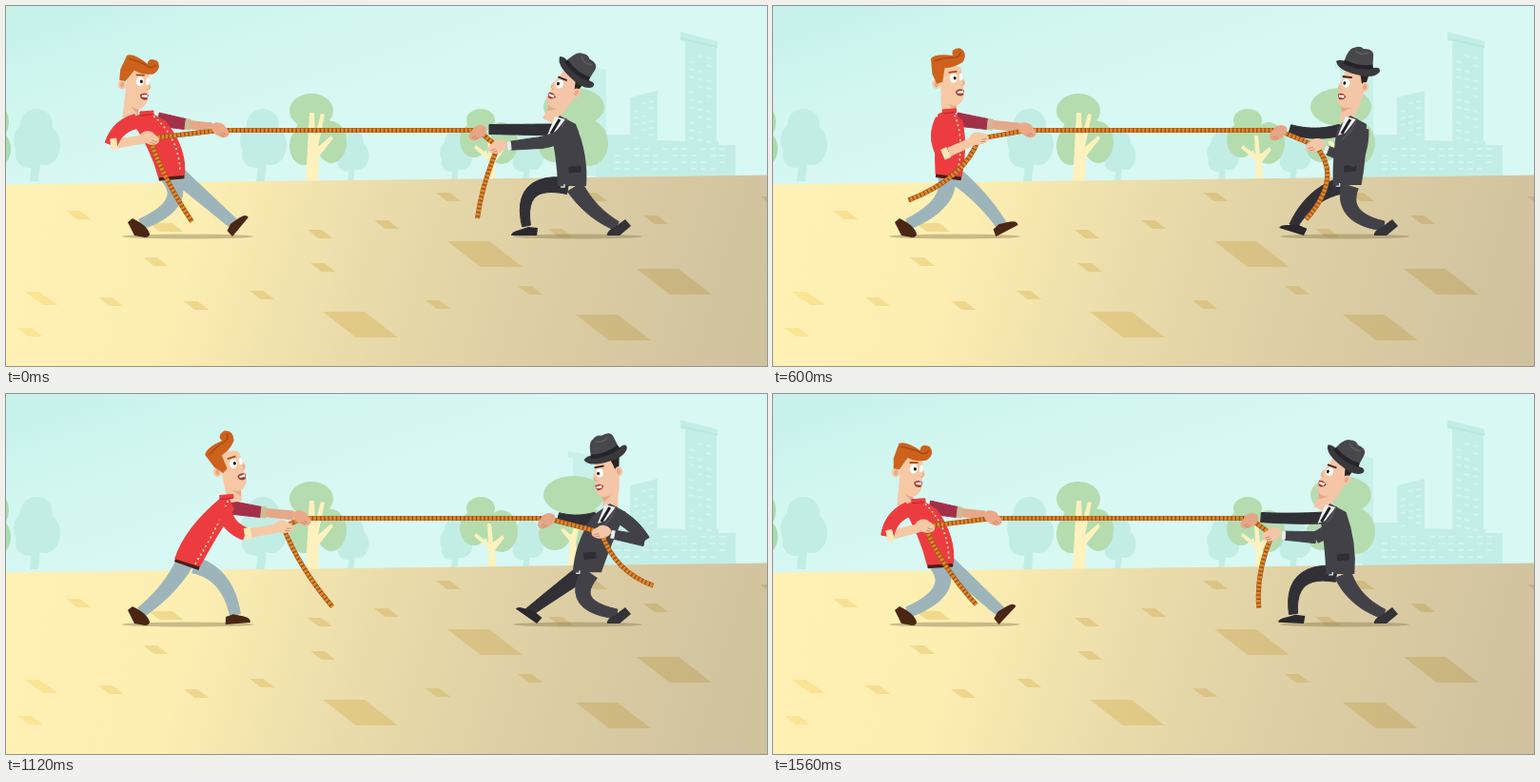
An HTML page that plays this animation: 800x378 px, repeating every 1600 ms.

```html
<!DOCTYPE html>
<html lang="en">
<head>
<meta charset="utf-8">
<title>Tug of war</title>
<style>
html, body { margin: 0; width: 100%; height: 100%; overflow: hidden; background: #d2f6f0; }
svg { display: block; width: 100vw; height: 100vh; }
</style>
</head>
<body>
<svg viewBox="0 0 800 378" preserveAspectRatio="none">
  <defs>
    <linearGradient id="sky" gradientUnits="userSpaceOnUse" x1="60" y1="0" x2="120" y2="180">
      <stop offset="0" stop-color="#c8f1eb"/><stop offset=".45" stop-color="#d1f6f0"/><stop offset="1" stop-color="#d8f8f3"/>
    </linearGradient>
    <linearGradient id="sand" gradientUnits="userSpaceOnUse" x1="0" y1="190" x2="760" y2="420">
      <stop offset="0" stop-color="#fff1b4"/><stop offset=".25" stop-color="#fdeeb2"/>
      <stop offset=".5" stop-color="#e9dbaa"/><stop offset=".75" stop-color="#dbcca3"/><stop offset="1" stop-color="#d0c29f"/>
    </linearGradient>
    <linearGradient id="tile" gradientUnits="userSpaceOnUse" x1="0" y1="0" x2="760" y2="0">
      <stop offset="0" stop-color="#fde794"/><stop offset=".45" stop-color="#e3cb86"/><stop offset="1" stop-color="#c6b280"/>
    </linearGradient>
  </defs>
  <rect width="800" height="378" fill="url(#sky)"/>
  <g id="town"></g>
  <g id="trees"></g>
  <path d="M0 187.5L800 177.5V378H0Z" fill="url(#sand)"/>
  <g id="tiles" fill="url(#tile)"></g>
  <g fill="#8d7a50" opacity=".45">
    <ellipse cx="191" cy="242" rx="69" ry="2.4"/><ellipse cx="601" cy="242" rx="68" ry="2.4"/>
  </g>
  <g id="actors"></g>
</svg>
<script>
const $ = id => document.getElementById(id);
const LOOP = 1600, STEP = 40;

/* ---------- drawing helpers ---------- */
const n = v => v.toFixed(1);
const xy = p => n(p[0]) + ' ' + n(p[1]);
const add = (p, x, y) => [p[0] + x, p[1] + y];
const mix = (a, b, k) => [a[0] + (b[0] - a[0]) * k, a[1] + (b[1] - a[1]) * k];
const dist = (a, b) => Math.hypot(b[0] - a[0], b[1] - a[1]) || 1;
const polar = (p, deg, r) => add(p, r * Math.cos(deg * Math.PI / 180), r * Math.sin(deg * Math.PI / 180));
const path = (d, fill) => `<path d="${d}" fill="${fill}"/>`;
const line = (d, color, w, extra = '') =>
  `<path d="${d}" fill="none" stroke="${color}" stroke-width="${w}" ${extra}/>`;
const oval = (x, y, rx, ry, fill, turn = 0) =>
  `<ellipse cx="${x}" cy="${y}" rx="${rx}" ry="${ry}" fill="${fill}" transform="rotate(${turn} ${x} ${y})"/>`;
const place = (p, turn, body) => `<g transform="translate(${xy(p)}) rotate(${n(turn)})">${body}</g>`;

// Limb from a to b, its middle pushed aside by (bx, by), narrowing from w0 to w1
function limb(a, b, bx, by, w0, w1, fill) {
  const c = add(mix(a, b, .5), bx * 2, by * 2), left = [], right = [];
  for (let i = 0; i <= 12; i++) {
    const t = i / 12, p0 = mix(a, c, t), p1 = mix(c, b, t), p = mix(p0, p1, t);
    const k = (w0 + (w1 - w0) * t) / 2 / dist(p0, p1);
    const dx = (p1[0] - p0[0]) * k, dy = (p1[1] - p0[1]) * k;
    left.push(xy(add(p, -dy, dx)));
    right.unshift(xy(add(p, dy, -dx)));
  }
  return `<path d="M${left.concat(right).join('L')}Z" fill="${fill}" stroke="${fill}" stroke-linejoin="round"/>`;
}
const bar = (a, b, w0, w1, fill) => limb(a, b, 0, 0, w0, w1, fill);
const cuff = (a, b, len, w, fill) => bar(a, mix(a, b, len / dist(a, b)), w, w, fill);
const rope = d => line(d, '#9c4d14', 5, 'stroke-linejoin="round"') +
  line(d, '#dd872d', 4.4, 'stroke-linejoin="round" stroke-dasharray="2.8 1.4"');
const fist = (p, turn, fill, side) => place(p, turn,
  oval(0, 0, 10.5, 6.2, fill) + oval(side * -3, -4, 6, 3, fill, side * -15) +
  line(`M${side * 3} 1h${side * 5}M${side * 2} 3.5h${side * 5}`, '#c98265', .8));

// Elbow of a two-bone arm; side picks the way it bends
function elbow(a, b, upper, lower, side) {
  const d = Math.min(dist(a, b), upper + lower - .1);
  const along = (upper * upper - lower * lower + d * d) / (2 * d);
  const out = side * Math.sqrt(Math.max(0, upper * upper - along * along));
  const ux = (b[0] - a[0]) / d, uy = (b[1] - a[1]) / d;
  return add(a, ux * along - uy * out, uy * along + ux * out);
}

/* ---------- motion ---------- */
// Where the left man's leading hand is over the loop: [time, x]
const PULL = [[0, 225], [280, 231], [600, 267], [800, 319], [1120, 311], [1280, 297], [1560, 231]];
const key = i => {
  const c = PULL.length, turn = Math.floor(i / c), [t, x] = PULL[i - turn * c];
  return [t + turn * LOOP, x];
};
function pull(time) {
  let i = PULL.length - 1;
  while (PULL[i][0] > time) i--;
  const slope = j => (key(j + 1)[1] - key(j)[1]) / (key(j + 1)[0] - key(j)[0]);
  const tangent = j => {
    const h0 = key(j)[0] - key(j - 1)[0], h1 = key(j + 1)[0] - key(j)[0];
    return (h1 * slope(j - 1) + h0 * slope(j)) / (h0 + h1);
  };
  const [t0, x0] = key(i), [t1, x1] = key(i + 1), h = t1 - t0, t = (time - t0) / h, s = 1 - t;
  return x0 * (1 + 2 * t) * s * s + x1 * t * t * (3 - 2 * t) + h * t * s * (tangent(i) * s - tangent(i + 1) * t);
}

// lean is 0 when the left man is pulled tight back and 1 when he is dragged forward
let lean = 0;
const val = (a, b, arch = 0) => a + (b - a) * lean + 4 * arch * lean * (1 - lean);
const at = (a, b, arch = 0) => [val(a[0], b[0], arch), val(a[1], b[1])];
const sway = (t, peak, amp, mid) => mid + amp * Math.cos((t - peak) / LOOP * 2 * Math.PI);
// Loose rope end: both angles are measured from straight down
const tail = (hand, end, len, bend) => `${xy(polar(hand, 90 - bend, 44))} ${xy(polar(hand, 90 - end, len))}`;

function torso(fill, back, neck, front, br, bl, belly, spine) {
  const mid = (a, b, push) => xy(add(mix(a, b, .5), push, 0));
  return path(`M${xy(back)}L${xy(neck)}L${xy(front)}Q${mid(front, br, belly)} ${xy(br)}` +
    `L${xy(bl)}Q${mid(bl, back, spine)} ${xy(back)}Z`, fill);
}

/* ---------- left man ---------- */
const SKIN = '#f6c9a4', SHADE = '#e5a888', RED = '#ec3c3f', MAROON = '#a33049', JEANS = '#9db5ba', CREAM = '#fbe8b4';

const leftHead = neck => place(add(neck, val(-18, 8, 5), 3), val(8, -12),
  path('M-8 5L-9-45Q4-52 13-46L15-35Q20-30 15-27L16-17Q14-8 8-6L7 5Z', SKIN) +
  path('M-1-8Q5-5 8-6L7 0Z', SHADE) +
  oval(-13, -29, 4.5, 5, SKIN) + oval(-13, -29, 2, 3, SHADE) +
  oval(5, -35, 4, 5, '#fff') + oval(13, -36, 1.8, 4, '#fff') + oval(6.5, -35, 1.6, 1.8, '#2b1712') +
  line('M0-41L9-42', '#b04a12', 1.8) + line('M14-32Q19-29 13-27', SHADE, 1.2) +
  path('M7-21Q11-25 16-22L15-17Q11-15 8-18Z', '#a33a30') + path('M9-21L15-22L15-19L9-19Z', '#fff') +
  `<g transform="rotate(${n(val(24, -24))} -4 -42)">` +
  path('M-19-55Q-15-61 4-59Q1-66 11-67Q20-63 15-53Q6-46-4-46L-6-31L-12-29L-17-39Z', '#cc621c') +
  line('M-15-53Q-4-57 7-57Q12-58 12-63', '#a94510', 1.3) + '</g>');

function leftMan(neck, hip) {
  const tilt = val(-5, 20), br = polar(hip, tilt, 14), bl = polar(hip, tilt, -14), wide = val(19, 6);
  const ankle = [241, val(230, 232)];
  return limb(mix(bl, br, .78), ankle, val(0, 8, -2), val(0, -10, 2), 17, 11, JEANS) +
    place([val(238, 230), 242], val(-50, 0), path('M0 0H26Q28-4 20-7L9-10L1-8Z', '#4a2614')) +
    limb(mix(bl, br, .42), [142, 229], val(18, 1, 3), 2, 18, 11, JEANS) +
    path('M128 227L133 223Q148 230 151 239Q151 243 146 243L135 241Z', '#4a2614') +
    leftHead(neck) + bar(add(bl, 1, 1), add(br, -1, 1), 4, 4, '#4c1d16') +
    torso(RED, add(neck, -wide, val(8, 3)), neck, add(neck, wide, val(11, 16)), br, bl, val(13, -3), val(7, -16)) +
    line(`M${xy(add(neck, 2, 2))}Q${xy(add(mix(neck, br, .4), val(18, 3), 0))} ${xy(add(br, -5, -3))}`, CREAM, 1.6, 'stroke-dasharray="2 3.2"') +
    bar(add(neck, -8, 3), add(neck, 6, 2), 4, 4, RED) + line(`M${xy(add(neck, -8, 5))}l13 -1`, '#b7232d', 1);
}

/* ---------- right man ---------- */
const SUIT = '#434148', DARK = '#313036', FACE = '#f4c5a6';

const rightHead = neck => place(add(neck, val(-9, 2, 1), 3), val(28, -8),
  path('M7 4L8-10Q12-20 11-48L-12-50L-14-37Q-19-31-14-28L-15-18Q-13-12-8-11L-8 4Z', FACE) +
  path('M-9-11Q-2-9 4-14L-7-5Z', SHADE) +
  path('M2-52H13L12-42L8-37L5-45Z', '#2d2220') +
  oval(11, -36, 4.2, 5, FACE) + oval(11, -36, 1.9, 3, SHADE) +
  oval(-9, -36, 4, 4.6, '#fff') + oval(-10.5, -35.6, 1.5, 1.8, '#241a18') +
  line('M-14-42L-4-43', '#2d2220', 1.8) + line('M-14-32Q-18-29-12-28', SHADE, 1.2) +
  path('M-15-23Q-10-26-6-22Q-8-17-13-18Z', '#a33a30') + path('M-14-22L-8-23L-8-20L-13-20Z', '#fff') +
  `<g transform="rotate(${n(val(14, -14))} 0 -52)">` +
  path('M-24-56Q-19-60-12-57L16-58Q24-61 23-55Q18-46 0-47Q-21-47-24-56Z', '#39383c') +
  path('M-16-55Q-15-72-9-74Q-3-78 1-75Q12-78 13-69L15-57Q0-51-16-55Z', '#48474c') +
  line('M-16-57Q0-53 15-59', '#252428', 4.5) + line('M-7-71Q0-67 7-72', '#5d5c62', 1.5) + '</g>');

function rightMan(neck, hip, front, cuffEnd) {
  const br = add(hip, 15, 0), bl = add(hip, -15, 0);
  return limb(add(front, 4, 2), cuffEnd, 0, val(0, 2, 3), 12, 10, DARK) +
    limb(add(hip, -4, 0), [547, 231], val(-16, 2, 4), val(-15, -1, 2), 17, 9, DARK) +
    place([558, 241], val(0, 38), path('M0 0H-27Q-27-4-18-6L-9-9L1-8Z', '#29282c')) +
    limb(add(hip, 3, 1), [642, 231], val(-3, -19, -4), val(3, 6, 2), 18, 10, SUIT) +
    path('M632 241Q631 236 640 232L651 224L657 231L645 241Z', '#343338') +
    rightHead(neck) +
    torso(SUIT, front, neck, add(neck, 17, 9), br, bl, val(8, -3), val(3, -10)) +
    path(`M${xy(add(neck, -5, 1))}l11 3l-11 14l-8 3Z`, '#eef1f2') +
    line(`M${xy(add(neck, 0, 4))}l-9 15`, '#1f1e22', 3) +
    line(`M${xy(add(neck, 7, 3))}l-7 14l-9 9`, '#56545b', 1.6) +
    bar(add(br, -18, -17), add(br, -6, -18), 6, 6, '#2f2e34') +
    line(`M${xy(add(bl, 3, 1))}h4v-3`, '#cfe0e6', 1.4);
}

/* ---------- frame ---------- */
function nearArm(shoulder, hand, joint, bulge, w, fill) {
  const k = bulge / dist(shoulder, joint);
  return limb(shoulder, joint, (shoulder[1] - joint[1]) * k, (joint[0] - shoulder[0]) * k, w, w - 2, fill);
}

function render(time) {
  const t = Math.floor(time % LOOP / STEP) * STEP, x = pull(t);
  lean = (x - 225) / 94;

  const lNeck = at([149, 110], [242, 105], -4), lHip = at([174, 179], [191, 177], 3);
  const lFar = [x, 130.5], lNear = at([151, 139], [306, 140], -4);
  const lFarTop = add(lNeck, val(11, 1), val(9, 14)), lTop = add(lNeck, val(-12, -4), val(11, 14));
  const lElbow = elbow(lTop, lNear, 36, 41, 1), lCuff = mix(lFarTop, lFar, .44), lWrist = add(lFar, -9, -3);

  const rNeck = at([582, 115], [640, 115], -1), rHip = at([595, 189], [612, 187], 1);
  const rFar = at([496, 130.5], [575, 130.5]), rNear = at([517, 148], [636, 145]);
  const rFront = add(rNeck, val(-10, -19), 13), rTop = add(rNeck, 12, 15);
  const rElbow = elbow(rTop, rNear, 34, 46, -1), rWrist = mix(rNear, rElbow, .3);

  const lSwing = sway(t, 1345, 50, 0), rSwing = sway(t, 1070, 41, 4);
  const cord = `M${xy(lNear)}L${xy(lFar)}L${xy(rFar)}L${xy(rNear)}Q${tail(rNear, rSwing, 78, sway(t, 760, 36, 13))}` +
    `M${xy(lNear)}Q${tail(lNear, lSwing, 98, lSwing / 2 + 5)}`;

  $('actors').innerHTML =
    bar(lCuff, lWrist, 8, 9, SHADE) + bar(lFarTop, lCuff, 14, 11, MAROON) + cuff(lCuff, lWrist, 5, 11, '#cdbb93') +
    leftMan(lNeck, lHip) + rightMan(rNeck, rHip, rFront, add(rFar, 12, -1)) +
    rope(cord) +
    fist(lFar, 32, '#eba98a', 1) + fist(add(rFar, 0, 3), -35, '#e5a688', -1) +
    bar(lElbow, lNear, 9, 8, SKIN) + nearArm(lTop, lNear, lElbow, 5, 15, RED) +
    cuff(lElbow, lNear, 6, 11, CREAM) + fist(lNear, val(20, 8, -20), SKIN, 1) +
    nearArm(rTop, rNear, rElbow, -2, 14, SUIT) + bar(rElbow, rWrist, 12, 9, SUIT) +
    cuff(rWrist, rNear, 3, 8, '#e8ecee') + fist(rNear, val(-20, -8), FACE, -1);
}

/* ---------- scenery ---------- */
const PALE = '#c2ede5', GREEN = '#b4dcaf', TRUNK = '#fdf1bd', TOWN = '#c3eee8';

function panes(x, y, cols, rows, dx, dy, tilt) {
  let d = '';
  for (let r = 0; r < rows; r++)
    for (let c = 0; c < cols; c++)
      if ((r * 5 + c * 3) % 4) d += `M${x + c * dx} ${y + r * dy + c * tilt}l${dx * .6} ${tilt * .6}`;
  return line(d, '#d1f4ee', 2);
}
$('town').innerHTML =
  path('M591 60L631 67V178H596V67L591 66Z', '#c8f1ea') +
  path('M709 27L748 37V44H747V180H714V37L709 36Z', TOWN) + line('M709 34L748 43', '#b8e8e0', 2) +
  path('M656 96L685 89V180H656Z', TOWN) +
  path('M632 135H656V140L720 142H749V146H767V180H620V150H632Z', TOWN) +
  panes(718, 50, 3, 12, 9, 8, 2) + panes(660, 104, 3, 6, 8, 7, -1.6) + panes(640, 150, 12, 4, 10, 7, 0);

const blobs = (color, ...list) => list.map(b => oval(...b, color)).join('');
const paleTree = (x, k) => `<g transform="translate(${x} 184) scale(${k})">` +
  blobs(PALE, [0, -60, 17, 16], [-9, -43, 15, 18], [9, -38, 16, 21], [-8, -28, 14, 14]) +
  path('M-5-20H4L2 0H-7Z', PALE) + '</g>';
$('trees').innerHTML =
  [32, 270].map(x => paleTree(x, 1)).join('') + [364, 473, 548].map(x => paleTree(x, .7)).join('') +
  blobs('#a9dcae', [-6, 122, 9, 16], [-8, 150, 13, 18]) +
  blobs(GREEN, [321, 110, 23, 18], [313, 147, 15, 20], [342, 143, 16, 22], [325, 130, 20, 16]) +
  path('M315 184L319 112H324L325 136L331 113L335 114L328 148L342 136L344 139L329 158L328 184Z', TRUNK) +
  blobs(GREEN, [499, 120, 15, 12], [492, 141, 15, 18], [521, 144, 17, 22]) +
  path('M507 181L508 163L492 149L494 146L507 156L506 136H510L512 156L522 148L524 151L514 164L515 181Z', TRUNK) +
  blobs(GREEN, [597, 106, 32, 20], [613, 144, 20, 24], [577, 147, 17, 17]) +
  path('M591 181L593 155L583 143L586 141L594 148L600 132L604 133L599 156L601 181Z', TRUNK);

// Every floor tile is the same slanted shape at one of two sizes
const tiles = (h, ...spots) => spots.map(([x, y]) =>
  `<path d="M${x} ${y}h${h * 1.63}l${h * 1.29} ${h}h${-h * 1.63}Z"/>`).join('');
$('tiles').innerHTML =
  tiles(27, [464, 247], [663, 276], [333, 321], [599, 324]) +
  tiles(9, [63, 215], [144, 264], [20, 300], [28, 305], [12, 338], [97, 306], [187, 310], [150, 228], [160, 228],
    [256, 299], [317, 235], [387, 225], [320, 270], [441, 309], [538, 294], [670, 220], [452, 196], [606, 196], [570, 234], [793, 200]);

function tick(now) {
  render(now);
  requestAnimationFrame(tick);
}
render(0);
requestAnimationFrame(tick);
</script>
</body>
</html>
```
